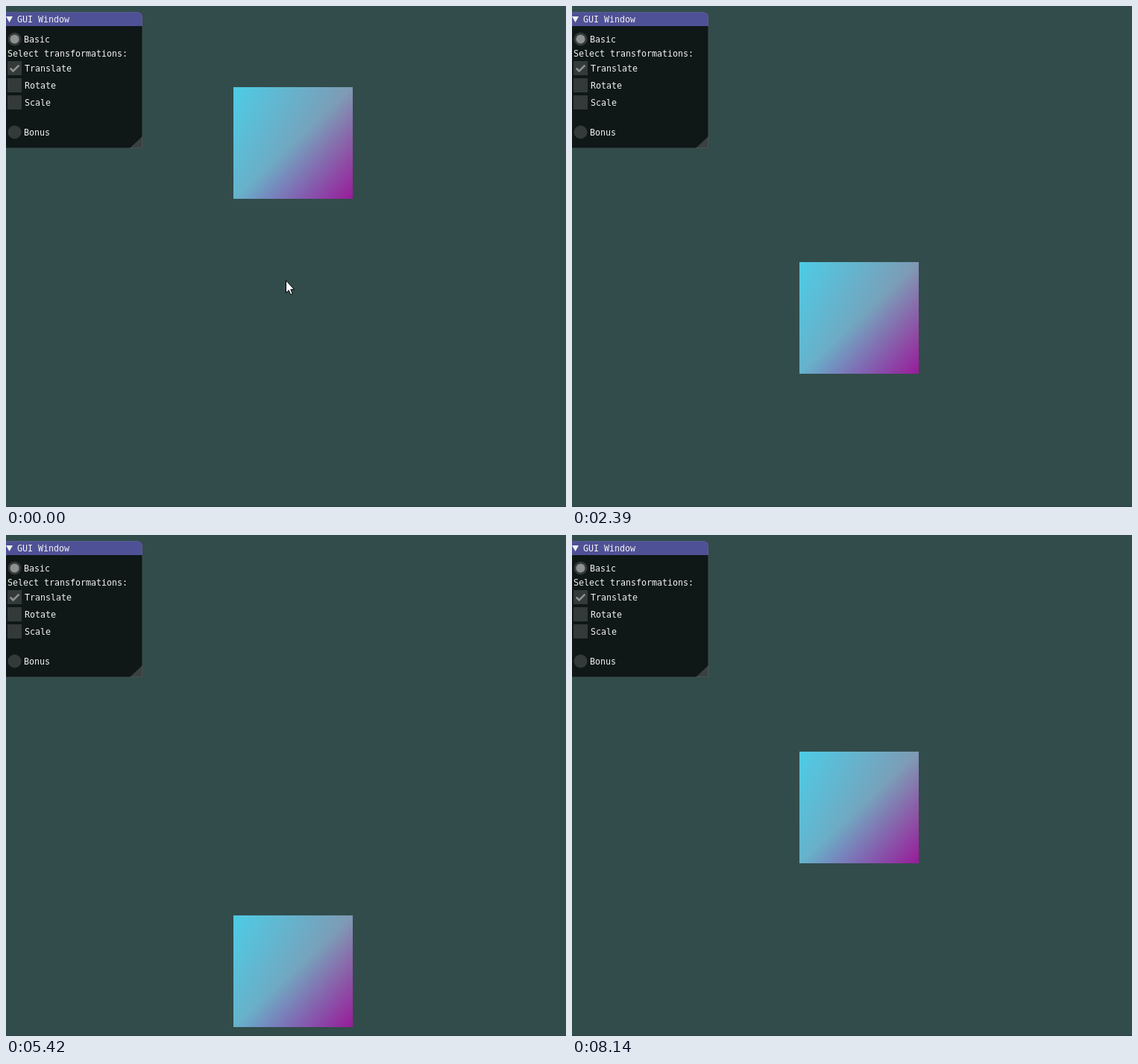
These frames come from a looping animation (751 by 673 pixels, 8240 ms). An HTML page with a canvas:

```html
<!DOCTYPE html>
<html lang="en">
<head>
<meta charset="utf-8">
<title>GUI Window</title>
<style>
  html, body { margin: 0; width: 100%; height: 100%; overflow: hidden; background: #324c4b; }
  svg, canvas { position: absolute; left: 0; top: 0; display: block; }
  #quad { left: 305px; }
  text { font: 11.63px "DejaVu Sans Mono", monospace; fill: #f2f2f2; white-space: pre; }
  .frame { fill: #343939; }
  .mark { fill: #8d9190; }
</style>
</head>
<body>
<svg width="751" height="673" viewBox="0 0 751 673">
  <rect y="672" width="751" height="1" fill="#2b4241"/>
  <path d="M0 8H176Q183 8 183 15V191H0Z" fill="#0f1717"/>
  <path d="M0 8H176Q183 8 183 15V27H0Z" fill="#4f5196"/>
  <path d="M183 175V191H166Z" fill="#3b4040"/>
  <path d="M0 8.5H176Q182.5 8.5 182.5 15V190.5H0" fill="none" stroke="#808080" stroke-opacity=".25"/>
  <path d="M0 14H9L4.5 22Z" fill="#f2f2f2"/>
  <g class="frame">
    <circle cx="11.5" cy="44.5" r="9"/>
    <circle cx="11.5" cy="169.5" r="9"/>
    <rect x="2" y="74" width="19" height="19"/>
    <rect x="2" y="97" width="19" height="19"/>
    <rect x="2" y="120" width="19" height="19"/>
  </g>
  <circle class="mark" cx="11.5" cy="44.5" r="6"/>
  <path d="M5.7 83.6L9.6 87.5L17.4 79.7" fill="none" stroke="#8d9190" stroke-width="2.6"/>
  <text x="15" y="22">GUI Window</text>
  <text x="24" y="49">Basic</text>
  <text x="2" y="68">Select transformations:</text>
  <text x="25" y="88">Translate</text>
  <text x="25" y="111">Rotate</text>
  <text x="25" y="134">Scale</text>
  <text x="24" y="174">Bonus</text>
</svg>
<canvas id="quad" width="160" height="150"></canvas>
<svg id="cursor" width="14" height="22" viewBox="0 0 14 22">
  <path d="M.5 .8V17.3L4.2 13.8L6.7 19.6L9.2 18.5L6.8 12.8H11.6Z" fill="#fff" stroke="#000"/>
</svg>
<script>
const LOOP = 8240;
const quad = document.getElementById('quad');
const cursor = document.getElementById('cursor');

// The screen refreshes at an even pace, a little slower near the turning point
function refreshTimes() {
  const times = [0];
  let start = 0;
  for (const [end, count] of [[4460, 32], [5420, 6], [8140, 19]]) {
    for (let k = 1; k <= count; k++) times.push(start + (end - start) * k / count);
    start = end;
  }
  return times;
}

// Cosine swing; its clock lags at first and then catches up
function quadY(t) {
  const clock = t - 235 * Math.exp(-t / 450);
  return Math.round(304 + 212 * Math.cos(0.000522 * (clock - 5010)));
}

const at = (x, y) => `translate(${x}px, ${y}px)`;

// Speeds up along a straight line, then leaves
function cursorPose(k) {
  const u = Math.min(k / 5, 1) ** 1.6;
  return {
    transform: at(Math.round(375 + 295 * u), Math.round(368 + 126 * u)),
    opacity: k > 5 ? 0 : 1
  };
}

// Two triangles with colours blended between the corners
function paintQuad() {
  const tl = [77, 204, 230], tr = [128, 153, 179];
  const bl = [102, 179, 204], br = [153, 26, 153];
  const ctx = quad.getContext('2d');
  const { width: w, height: h } = quad;
  const img = ctx.createImageData(w, h);
  for (let y = 0, p = 0; y < h; y++) {
    for (let x = 0; x < w; x++, p += 4) {
      const u = (x + 0.5) / w, v = (y + 0.5) / h;
      for (let c = 0; c < 3; c++) {
        img.data[p + c] = u + v < 1
          ? tl[c] + u * (tr[c] - tl[c]) + v * (bl[c] - tl[c])
          : br[c] + (1 - u) * (bl[c] - br[c]) + (1 - v) * (tr[c] - br[c]);
      }
      img.data[p + 3] = 255;
    }
  }
  ctx.putImageData(img, 0, 0);
}

const times = refreshTimes();

// Hold each pose until the next refresh
function play(el, pose) {
  const frames = times.map((t, k) => ({ offset: t / LOOP, easing: 'steps(1, end)', ...pose(k, t) }));
  frames.push({ ...frames[frames.length - 1], offset: 1 });
  return el.animate(frames, { duration: LOOP, iterations: Infinity });
}

paintQuad();
const quadAnim = play(quad, (k, t) => ({ transform: at(0, quadY(t)) }));
const cursorAnim = play(cursor, cursorPose);
quadAnim.startTime = cursorAnim.startTime = document.timeline.currentTime;
</script>
</body>
</html>
```
